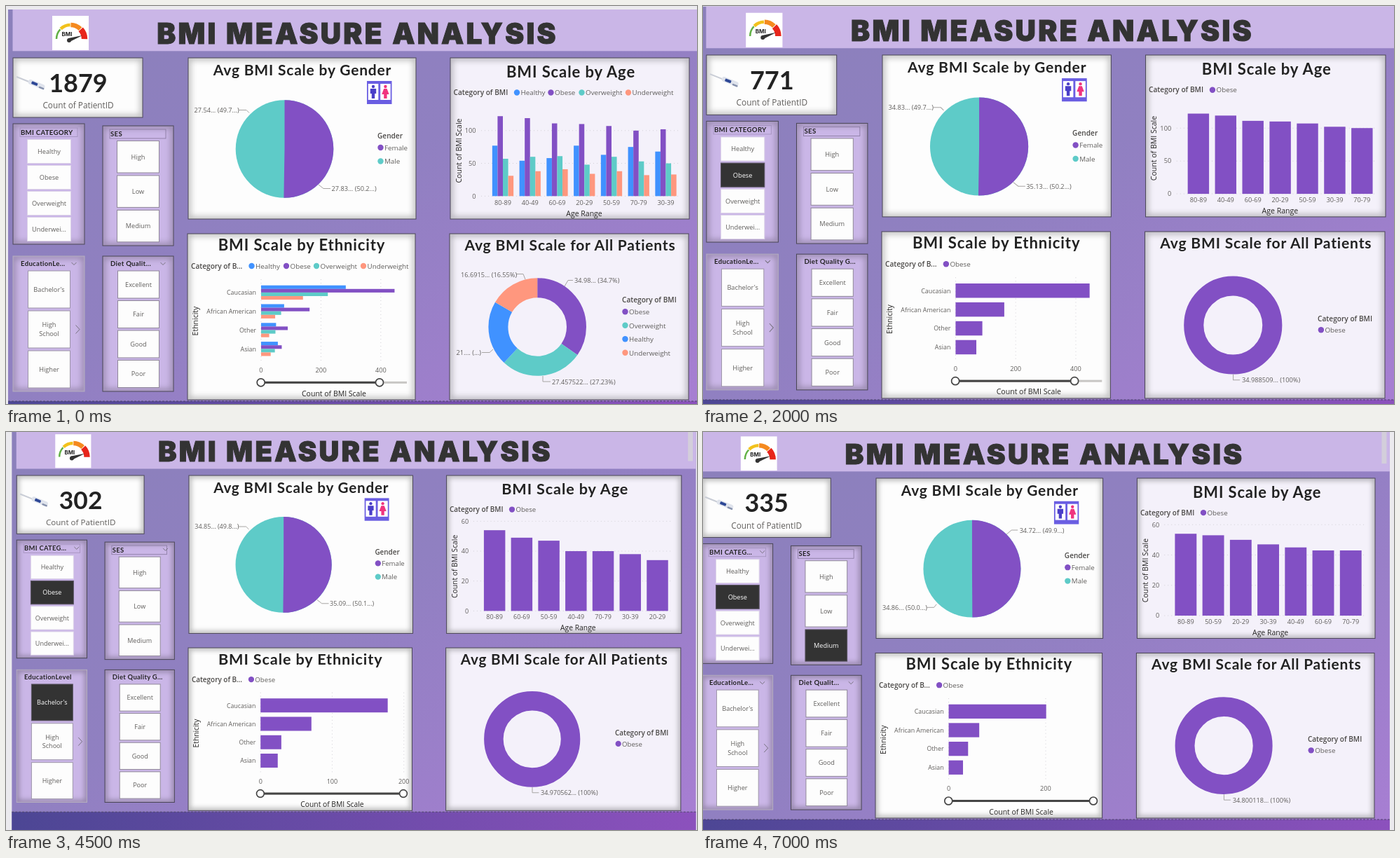
Animation, 986 px wide and 568 px high, one loop 8 s. Source, as an HTML page:

```html
<!DOCTYPE html>
<html lang="en">
<head>
<meta charset="utf-8">
<title>BMI dashboard</title>
<style>
  html, body { margin: 0; width: 100%; height: 100%; overflow: hidden; background: #ebeaee; }
  svg { display: block; }
  text { font-family: 'Open Sans', sans-serif; font-size: 9.2px; fill: #605e5c; white-space: pre; }
  .legend { font-size: 9.8px; }
  .head { font-size: 10.1px; font-weight: 600; fill: #4a4846; }
  .axis { font-size: 10.5px; fill: #252423; }
  .title, .count, .slicer { font-family: 'Comic Sans MS', Lato, sans-serif; font-weight: 700; fill: #222; }
  .title { font-size: 22px; letter-spacing: .9px; }
  .long { font-size: 21px; letter-spacing: .8px; }
  .count { font-size: 36px; }
  .slicer { font-size: 9.6px; letter-spacing: .3px; }
  .main { font: 900 40.5px Inter, sans-serif; letter-spacing: 3.3px; fill: #333; stroke: #333; stroke-width: 1; }
  .label { font-size: 11.8px; }
  .on { fill: #fff; }
  .mid { text-anchor: middle; }
  .end { text-anchor: end; }
  .grid { stroke: #d2d0d6; stroke-dasharray: 1 4; }
  .lead { fill: none; stroke: #a6a4a2; }
  .chev { fill: none; stroke: #77727f; }
</style>
</head>
<body>
<svg id="stage" width="986" height="568" viewBox="0 0 986 568">
  <defs>
    <linearGradient id="page" x2="1" y2="1">
      <stop stop-color="#8b80bb"/><stop offset=".45" stop-color="#9080c1"/><stop offset="1" stop-color="#a97ed4"/>
    </linearGradient>
    <linearGradient id="foot">
      <stop stop-color="#4c4694"/><stop offset="1" stop-color="#8c51bd"/>
    </linearGradient>
    <filter id="blur" x="-20%" y="-20%" width="140%" height="140%"><feGaussianBlur stdDeviation="4"/></filter>
  </defs>
  <g id="view"></g>
</svg>
<script>
const COLOR = { Healthy: '#4092ff', Obese: '#8250c4', Overweight: '#5ecbc8', Underweight: '#ff977e' };
const LILAC = '#cab6e7', PALE = '#f4f1fa', WHITE = '#fdfdfd';
const ALL = Object.keys(COLOR), OBESE = ['Obese'];
const ETHNIC = ['Caucasian', 'African American', 'Other', 'Asian'];

// view: scale x, scale y, shift x, shift y
const STATES = [
  { at: 0, view: [1, 1, 0, 0], count: 1879, series: ALL, picked: [],
    heads: ['BMI CATEGORY', 'SES', 'EducationLe...', 'Diet Qualit...'], chevrons: [0, 0, 1, 1],
    gender: ['27.83... (50.2...)', '27.54... (49.7...)'], female: 50.25,
    ageMax: 100, ageStep: 50, ages: {
      '80-89': [77, 122, 57, 31], '40-49': [54, 119, 60, 38], '60-69': [58, 111, 61, 41], '20-29': [77, 110, 48, 34],
      '50-59': [63, 107, 60, 38], '70-79': [75, 100, 53, 32], '30-39': [68, 102, 50, 33] },
    unit: .427, ticks: [0, 200, 400], knob: 533,
    ethnic: [[283, 446, 223, 140], [77, 162, 67, 47], [50, 89, 48, 27], [56, 69, 46, 32]] },
  { at: 500, view: [1.0042, 1.004, -5.1, -4.3], count: 771, series: OBESE, picked: ['Obese'],
    heads: ['BMI CATEGORY', 'SES', 'EducationLe...', 'Diet Quality G...'], chevrons: [0, 0, 1, 0],
    gender: ['35.13... (50.2...)', '34.83... (49.7...)'], female: 50.25,
    ageMax: 100, ageStep: 50, ages: { '80-89': [122], '40-49': [119], '60-69': [111], '20-29': [110], '50-59': [107], '30-39': [102], '70-79': [100] },
    unit: .427, ticks: [0, 200, 400], knob: 533, ethnic: [[446], [162], [89], [69]], total: '34.988509... (100%)' },
  { at: 3000, view: [.983, .98, 5.4, -10.5], count: 302, series: OBESE, picked: ['Obese', "Bachelor's"],
    heads: ['BMI CATEG...', 'SES', 'EducationLevel', 'Diet Quality G...'], chevrons: [1, 1, 0, 0], scrollbar: 1,
    gender: ['35.09... (50.1...)', '34.85... (49.8...)'], female: 50.17,
    ageMax: 60, ageStep: 20, ages: { '80-89': [54], '60-69': [49], '50-59': [47], '40-49': [40], '70-79': [40], '30-39': [38], '20-29': [34] },
    unit: 1.04, ticks: [0, 100, 200], knob: 571.3, ethnic: [[177.5], [71], [29], [24]], total: '34.970562... (100%)' },
  { at: 5500, view: [.9958, .994, -11.9, -7.6], count: 335, series: OBESE, picked: ['Obese', 'Medium'],
    heads: ['BMI CATEG...', 'SES', 'EducationLe...', 'Diet Qualit...'], chevrons: [1, 0, 1, 1], scrollbar: 1,
    gender: ['34.72... (49.9...)', '34.86... (50.0...)'], female: 49.9, flip: 1,
    ageMax: 60, ageStep: 20, ages: { '80-89': [54], '50-59': [53], '20-29': [50], '30-39': [47], '40-49': [45], '60-69': [43], '70-79': [43] },
    unit: .695, ticks: [0, 200], knob: 571.3, ethnic: [[201], [63], [40], [29.5]], total: '34.800118... (100%)' }
];

const rect = (x, y, w, h, fill, more = '') => `<rect x="${x}" y="${y}" width="${w}" height="${h}" fill="${fill}" ${more}/>`;
const text = (x, y, s, cls = '', more = '') => `<text x="${x}" y="${y}" class="${cls}" ${more}>${s}</text>`;
const upright = (x, y, s) => text(x, y, s, 'axis mid', `transform="rotate(-90 ${x} ${y})"`);
const path = (d, cls, more = '') => `<path d="${d}" class="${cls}" ${more}/>`;
const dot = (x, y, r, fill, more = '') => `<circle cx="${x}" cy="${y}" r="${r}" fill="${fill}" ${more}/>`;
const key = (x, y, name, fill = COLOR[name]) => dot(x, y, 4.2, fill) + text(x + 5.5, y + 3.7, name, 'legend');

function panel(x, y, w, h, fill, border = '#4a4654') {
  return `<svg x="${x}" y="${y}" width="${w}" height="${h}">` + rect(0, 0, w, h, fill) +
    rect(0, 0, w, h, 'none', 'stroke="#000" stroke-opacity=".28" stroke-width="7" filter="url(#blur)"') + '</svg>' +
    rect(x, y, w, h, 'none', `stroke="${border}"`);
}

// Arc of a ring, clockwise from the top; start and share in percent.
function arc(x, y, r, width, start, share, color) {
  return dot(x, y, r, 'none', `stroke="${color}" stroke-width="${width}" pathLength="100" ` +
    `stroke-dasharray="${share} ${100 - share}" stroke-dashoffset="${-start}" transform="rotate(-90 ${x} ${y})"`);
}

// Filled wedge from the top, clockwise.
function wedge(x, y, r, share, color) {
  const a = share / 50 * Math.PI;
  return path(`M${x} ${y}V${y - r}A${r} ${r} 0 ${+(share > 50)} 1 ${x + r * Math.sin(a)} ${y - r * Math.cos(a)}Z`, '', `fill="${color}"`);
}

function buttons(x, y, w, h, pitch, names, picked, border) {
  return names.map((name, i) => {
    const top = y + i * pitch, on = picked.includes(name), lines = name.split('|');
    return rect(x, top, w, h, on ? '#333' : WHITE, `stroke="${on ? '#5a5562' : border}"`) +
      lines.map((s, k) => text(x + w / 2, top + h / 2 + 3.4 + (k - (lines.length - 1) / 2) * 13, s, on ? 'mid on' : 'mid')).join('');
  }).join('');
}

function backdrop(s) {
  return rect(3, 5, 993, 620, 'url(#page)') + rect(9.5, 5, 986.5, 59.3, LILAC) +
    rect(3, 564, 993, 60, 'url(#foot)') +
    path('M3 564H996', '', 'stroke="#4d4668" stroke-dasharray="3 2"') +
    (s.scrollbar ? rect(984.5, 0, 7, 53, '#d3cedb') : '') +
    text(501.5, 54, 'BMI MEASURE ANALYSIS', 'main mid');
}

function gauge() {
  const bands = [['#62b146', 2.5], ['#f2c21c', 4.5], ['#f58a1f', 6.5], ['#e8251b', 8.5]];
  return rect(66, 14, 52, 49, '#fff') +
    bands.map(([color, width], i) => arc(92, 47, 20, width, 75 + i * 12.7, 12, color)).join('') +
    text(87, 43, 'BMI', 'mid', 'style="font:700 8px Inter,sans-serif;fill:#222"') +
    path('M89 46L109 42L91 51Z', '', 'fill="#333"') + dot(90, 49, 3, '#333');
}

function countCard(s) {
  return panel(10, 74, 185, 85, WHITE) +
    path('M15 101L35 109', '', 'stroke="#c9cdd6" stroke-width="2"') +
    `<g transform="rotate(22 44 112)">` + rect(31, 108.5, 25, 7, '#dfe3ec', 'rx="3.5"') + rect(36, 110, 9, 4, '#2d4796', 'rx="1"') +
    rect(48, 113, 8, 2.5, '#8792ad', 'rx="1"') + '</g>' +
    text(103, 122.5, s.count, 'count mid') + text(103, 146, 'Count of PatientID', 'label mid');
}

function slicers(s) {
  const heads = [[21, 183.5, 97, 178], [149, 186, 226, 180], [21, 371, 97, 366], [149, 371, 224, 366]];
  return panel(10, 168, 102, 172, LILAC) + panel(138, 171, 101, 171, LILAC) +
    panel(10, 357, 102, 193, LILAC, '#b5aebf') + panel(138, 357, 101, 193, LILAC) +
    rect(20, 174, 82, 12.5, 'none', 'stroke="#a08fba" stroke-width=".8"') +
    rect(148, 176, 80, 13, 'none', 'stroke="#85769c" stroke-width=".8"') +
    heads.map(([x, y, cx, cy], i) => text(x, y, s.heads[i], 'slicer') +
      (s.chevrons[i] ? path(`M${cx - 3.5} ${cy}l3.5 3.5 3.5-3.5`, 'chev') : '')).join('') +
    buttons(30.5, 190.5, 62, 34, 37, ['Healthy', 'Obese', 'Overweight', 'Underwei...'], s.picked, '#dcd3e8') +
    buttons(158.5, 192.5, 60, 45.5, 49.4, ['High', 'Low', 'Medium'], s.picked, '#8f8799') +
    buttons(31.5, 378, 60, 53, 57, ["Bachelor's", 'High|School', 'Higher'], s.picked, '#9d95a8') +
    buttons(159.5, 378, 59, 39, 42.5, ['Excellent', 'Fair', 'Good', 'Poor'], s.picked, '#8f8799') +
    path('M99.5 455.5l5.5 6-5.5 6', 'chev');
}

function genderCard(s) {
  const person = (x, color, skirt) => rect(x, 111, 14.5, 23, '#fff') + dot(x + 7.2, 115, 2.2, color) +
    path(skirt ? `M${x + 5} 118h4.4l3 8h-3v6h-4.4v-6h-3z` : `M${x + 3} 118h8.4v7h-2v7h-4.4v-7h-2z`, '', `fill="${color}"`);
  const [female, male] = s.gender;
  const labels = s.flip
    ? text(465.5, 152.5, female) + path('M447 154.5L454 148.5H463', 'lead') +
      text(269, 263.5, male) + path('M332 259.5H343L346.5 255', 'lead')
    : text(268.5, 152, male) + path('M332 148.5H343L347 152.5', 'lead') +
      text(464.5, 264, female) + path('M446 255L453 260.5H463', 'lead');
  return panel(260, 74, 325, 230, WHITE) + text(423, 99, 'Avg BMI Scale by Gender', 'title long mid') +
    rect(515, 107, 35.5, 33, '#6a5ee2') + person(516.8, '#4a3ec8', 0) + person(534.2, '#f0347f', 1) +
    dot(397.5, 204, 69.8, COLOR.Overweight) + wedge(397.5, 204, 69.8, s.female, COLOR.Obese) + labels +
    text(530, 189, 'Gender', 'head') + key(534.5, 202, 'Female', COLOR.Obese) + key(534.5, 221.5, 'Male', COLOR.Overweight);
}

function ageCard(s) {
  const wide = s.ageMax > 60, unit = wide ? .935 : 2.177, base = 271.3;
  const first = wide ? 709 : 703.7, pitch = wide ? 38.75 : 39.4, barsWidth = wide ? 30.3 : 31;
  const keyX = { Healthy: 729, Obese: s.series === ALL ? 777.5 : 729, Overweight: 821.5, Underweight: 888 };
  let out = panel(634, 74, 341, 230, PALE) + text(806, 102, 'BMI Scale by Age', 'title mid') +
    text(638.5, 127, 'Category of BMI', 'head') + s.series.map(n => key(keyX[n], 123.5, n)).join('');
  for (let v = 0; v <= s.ageMax; v += s.ageStep) {
    const y = base - v * unit;
    out += path(`M${wide ? 678 : 673} ${y}H961`, 'grid') + text(wide ? 670.5 : 666, y + 3.3, v, 'end');
  }
  Object.entries(s.ages).forEach(([name, values], i) => {
    const x = first + i * pitch, w = barsWidth / values.length;
    values.forEach((v, k) => out += rect(x - barsWidth / 2 + k * w, base - v * unit, w, v * unit, COLOR[s.series[k]]));
    out += text(x, 283.5, name, 'mid');
  });
  return out + text(825, 299.5, 'Age Range', 'axis mid') + upright(649.5, 206.5, 'Count of BMI Scale');
}

function ethnicCard(s) {
  const keyX = { Healthy: 350.5, Obese: s.series === ALL ? 400 : 350.5, Overweight: 443, Underweight: 510 };
  let out = panel(259, 325, 325, 237, WHITE) + text(422, 349, 'BMI Scale by Ethnicity', 'title mid') +
    text(264, 375, 'Category of B...', 'head') + s.series.map(n => key(keyX[n], 371, n)).join('');
  s.ticks.forEach(v => {
    const x = 364 + v * s.unit;
    out += path(`M${x} 390V508`, 'grid') + text(x, 523, v, 'mid');
  });
  s.ethnic.forEach((values, i) => {
    const y = 408.9 + i * 26.8, h = 20.4 / values.length;
    values.forEach((v, k) => out += rect(364, y - 10.2 + k * h, v * s.unit, h, COLOR[s.series[k]]));
    out += text(357, y + 3.4, ETHNIC[i], 'end', 'style="font-size:8.9px"');
  });
  const knob = x => dot(x, 537.3, 5.5, '#fff', 'stroke="#444" stroke-width="1.7"');
  return out + rect(364, 535.8, 208, 3, '#c8c6c4') + rect(364, 535.8, s.knob - 364, 3, '#444') + knob(363.7) + knob(s.knob) +
    text(468, 556.5, 'Count of BMI Scale', 'axis mid') + upright(274, 449.5, 'Ethnicity');
}

function donutCard(s) {
  const ring = (start, share, name) => arc(758.2, 458, 55.8, 28, start, share, COLOR[name]);
  const out = panel(633, 325, 341, 237, PALE) + text(805, 349, 'Avg BMI Scale for All Patients', 'title long mid');
  if (s.total) return out + ring(0, 100, 'Obese') + path('M758.5 528V536H768', 'lead') + text(770.8, 539.5, s.total) +
    text(878.5, 452.3, 'Category of BMI', 'head') + key(883.3, 464.7, 'Obese');
  const names = ['Obese', 'Overweight', 'Healthy', 'Underweight'], shares = [34.7, 27.23, 21.52, 16.55];
  let start = 0;
  return out + shares.map((p, i) => ring((start += p) - p, p, names[i])).join('') +
    path('M797 400L802 391.5H809', 'lead') + text(811, 395, '34.98... (34.7%)') +
    path('M766 528V536H777', 'lead') + text(779, 540, '27.457522... (27.23%)') +
    path('M679 494.5H690L695 490', 'lead') + text(642.5, 498, '21.... (...)') +
    path('M728 382.5H738L741 390', 'lead') + text(649, 386.5, '16.6915... (16.55%)') +
    text(879, 423, 'Category of BMI', 'head') + names.map((n, i) => key(883.5, 436.3 + i * 19.5, n)).join('');
}

const view = document.getElementById('view');
const parts = [backdrop, gauge, countCard, slicers, genderCard, ageCard, ethnicCard, donutCard];
let shown;

function tick() {
  const time = performance.now() % 8000;
  const state = STATES.filter(s => s.at <= time).pop();
  if (state !== shown) {
    const [sx, sy, dx, dy] = state.view;
    view.setAttribute('transform', `matrix(${sx} 0 0 ${sy} ${dx} ${dy})`);
    view.innerHTML = parts.map(draw => draw(state)).join('');
    shown = state;
  }
  requestAnimationFrame(tick);
}
tick();
</script>
</body>
</html>
```
